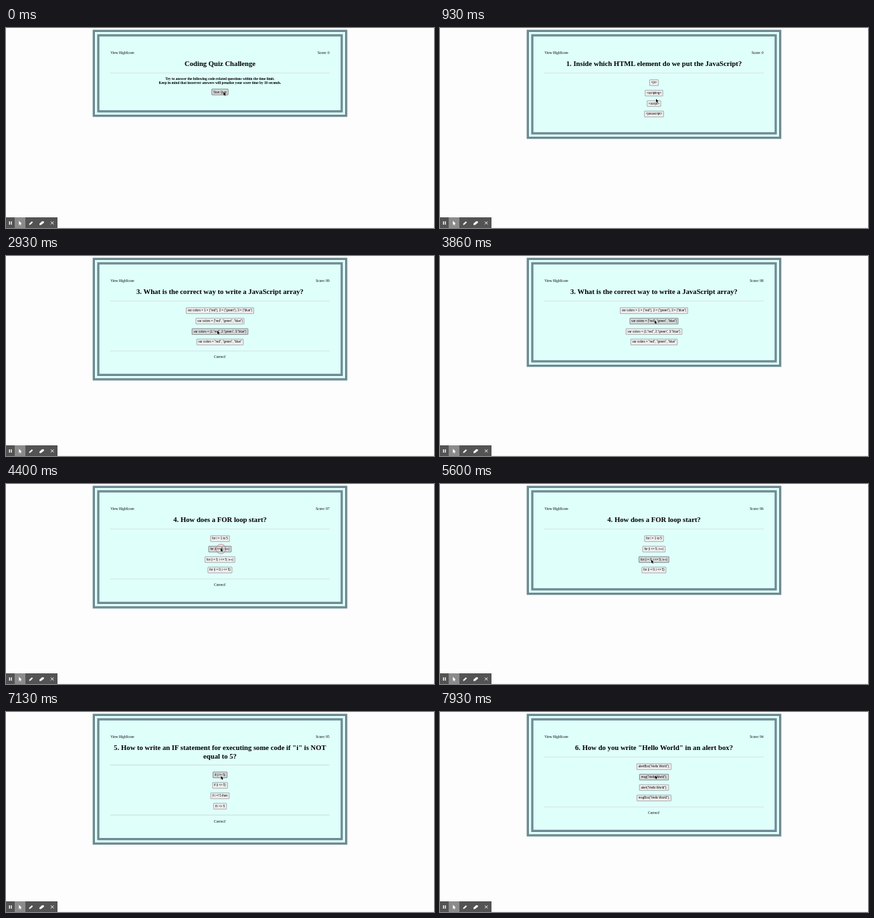
Recreate the animation shown at these times as an HTML page. Size 640x300 px, loop 8000 ms.

```html
<!DOCTYPE html>
<html lang="en">
<head>
<meta charset="utf-8">
<title>Coding Quiz</title>
<style>
  html, body { margin: 0; width: 100%; height: 100%; overflow: hidden; background: #fdfdfd; }
  #stage { position: absolute; left: 0; top: 0; width: 640px; height: 300px; overflow: hidden; }
  /* The quiz page is laid out at 1920 x 900 and shown at a third of its size. */
  #page {
    position: absolute; width: 1920px; height: 900px;
    transform: scale(.333333); transform-origin: 0 0;
    font: 16px/18px "Liberation Serif", "Times New Roman", serif; color: #000;
  }
  #page > *, #panel > * { position: absolute; margin: 0; }
  #card {
    left: 389px; top: 8px; width: 1142px; box-sizing: border-box;
    border: 30px double #6f8992; background: #dffffb;
  }
  #link { left: 469px; top: 104px; }
  #score { right: 469px; top: 104px; }
  h1 { left: 469px; top: 143px; width: 982px; text-align: center; font-size: 32px; line-height: 37px; }
  #panel { left: 469px; width: 982px; text-align: center; }
  #panel hr { left: 0; right: 0; }
  #panel p { left: 0; right: 0; }
  #panel .intro { top: 18px; font-weight: bold; line-height: 18.5px; }
  #panel .result { top: 244px; }
  button {
    left: 50%; transform: translateX(-50%); height: 28px; padding: 0 6px; box-sizing: border-box;
    border: 2px solid #858585; border-radius: 2px; background: #efefef; color: #000;
    font: 13.333px "Liberation Sans", Arial, sans-serif; white-space: nowrap;
  }
  button.hover { background: #d9dcdc; border-color: #555; }
  svg { position: absolute; left: 0; top: 0; }
</style>
</head>
<body>
<div id="stage">
  <div id="page">
    <div id="card"></div>
    <div id="link">View HighScore</div>
    <div id="score"></div>
    <h1></h1>
    <div id="panel"></div>
  </div>
  <svg width="640" height="300" viewBox="0 0 640 300">
    <path d="M77 299.5H640" stroke="#f3f3f3"/>
    <path d="M0 284H77V300H0Z" fill="#535353"/>
    <path d="M13 284H29V300H13Z" fill="#8b8b8b"/>
    <g fill="#fff">
      <path d="M4.6 290H6V295H4.6ZM7.3 290H8.7V295H7.3Z"/>
      <path d="M19.3 289.3V295.4L20.7 294.2L21.7 296.2L22.6 295.8L21.7 293.8L23.6 293.6Z"/>
      <path d="M34.5 295.5L35 293.6L38.7 289.9L40.2 291.4L36.5 295.1Z"/>
      <path d="M50 293.4L54.2 289.8L57 290.2L56.4 292.2L52.5 295.6L50 295.5Z"/>
    </g>
    <path d="M67.1 290.3L71.3 294.5M71.3 290.3L67.1 294.5" stroke="#fff"/>
    <circle id="ring" r="7.2" fill="none" stroke="#cf7f82" stroke-width="1"/>
    <path id="cursor" d="M0 0V5.2L1.2 4.1L2 5.9L2.9 5.5L2.1 3.8H3.7Z" fill="#000" stroke="#fff" stroke-width=".5" paint-order="stroke"/>
  </svg>
</div>
<script>
const LOOP = 8000;
const FEEDBACK = 1000;
const RING = 100;
const QUIZ_START = 300;

const greet = name => name + '("Hello World");';

const screens = [
  { at: 0, title: "Coding Quiz Challenge", height: 392 },
  { at: QUIZ_START, title: "1. Inside which HTML element do we put the JavaScript?",
    options: ["<js>", "<scripting>", "<script>", "<javascript>"] },
  { at: 1500, title: "2. How do you round the number 7.25, to the nearest integer?",
    options: ["round(7.25)", "Math.rnd(7.25)", "Math.round(7.25)", "rnd(7.25)"] },
  { at: 2800, title: "3. What is the correct way to write a JavaScript array?",
    options: [
      'var colors = 1 = ("red"), 2 = ("green"), 3 = ("blue")',
      'var colors = ["red", "green", "blue"]',
      'var colors = (1:"red", 2:"green", 3:"blue")',
      'var colors = "red", "green", "blue"'] },
  { at: 4360, title: "4. How does a FOR loop start?",
    options: ["for i = 1 to 5", "for (i <= 5; i++)", "for (i = 0; i <= 5; i++)", "for (i = 0; i <= 5)"] },
  { at: 6230, title: '5. How to write an IF statement for executing some code if "i" is NOT equal to 5?',
    extra: 37, options: ["if (i != 5)", "if (i <> 5)", "if i =! 5 then", "if i <> 5"] },
  { at: 7760, title: '6. How do you write "Hello World" in an alert box?',
    options: ["alertBox", "msg", "alert", "msgBox"].map(greet) }
];

// time, x, y of the pointer tip
const path = [
  [0, 325.3, 96], [400, 325.3, 96], [1250, 322, 111], [1900, 322, 110.5],
  [2660, 316, 112], [3130, 316, 112], [3930, 321, 96], [4730, 321, 96],
  [5600, 316, 113.5], [6400, 316, 113.5], [7000, 321.5, 96], [7600, 321.5, 96],
  [7730, 321.7, 95.2], [LOOP, 321.7, 95.2]
];

const $ = selector => document.querySelector(selector);
const card = $("#card"), score = $("#score"), heading = $("h1"), panel = $("#panel");
const cursor = $("#cursor"), ring = $("#ring");
let shown = "";

function add(tag, text, top, className = "") {
  const node = document.createElement(tag);
  node.textContent = text;
  node.className = className;
  if (top !== undefined) node.style.top = top + "px";
  panel.append(node);
  return node;
}

function build(screen, feedback) {
  const extra = screen.extra || 0;
  heading.textContent = screen.title;
  card.style.height = (screen.height || 491 + extra + (feedback ? 61 : 0)) + "px";
  panel.style.top = 202 + extra + "px";
  panel.replaceChildren();
  add("hr", "", 0);
  if (!screen.options) {
    add("p", "Try to answer the following code-related questions within the time limit.", undefined, "intro")
      .append(document.createElement("br"),
        "Keep in mind that incorrect answers will penalize your score time by 10 seconds.");
    add("button", "Start Quiz", 72);
    return;
  }
  screen.options.forEach((text, i) => add("button", text, 29.5 + 47 * i));
  if (feedback) {
    add("hr", "", 225);
    add("p", "Correct!", undefined, "result");
  }
}

function pointerAt(t) {
  const i = path.findIndex(p => p[0] > t);
  const [t0, x0, y0] = path[i - 1], [t1, x1, y1] = path[i];
  const u = (t - t0) / (t1 - t0), k = u * u * (3 - 2 * u);
  return [x0 + (x1 - x0) * k, y0 + (y1 - y0) * k];
}

function render(t) {
  const index = screens.findLastIndex(s => s.at <= t);
  const feedback = index > 1 && t < screens[index].at + FEEDBACK;
  const key = index + "," + feedback;
  if (key !== shown) {
    build(screens[index], feedback);
    shown = key;
  }
  const ticks = Math.floor((t - QUIZ_START) / 1000);
  score.textContent = "Score: " + (ticks < 1 ? 0 : 101 - ticks);

  const [x, y] = pointerAt(t);
  cursor.setAttribute("transform", `translate(${x} ${y})`);
  ring.setAttribute("transform", `translate(${x + .5} ${y + 1.5})`);
  const clicking = screens.some(s => s.at && Math.abs(t - s.at) < RING);
  ring.setAttribute("visibility", clicking ? "visible" : "hidden");

  const stage = $("#stage").getBoundingClientRect();
  for (const button of panel.querySelectorAll("button")) {
    const box = button.getBoundingClientRect();
    const px = x + stage.left, py = y + stage.top;
    button.classList.toggle("hover",
      px > box.left && px < box.right && py > box.top && py < box.bottom);
  }
}

const began = performance.now();
function frame() {
  render((performance.now() - began) % LOOP);
  requestAnimationFrame(frame);
}
frame();
</script>
</body>
</html>
```
